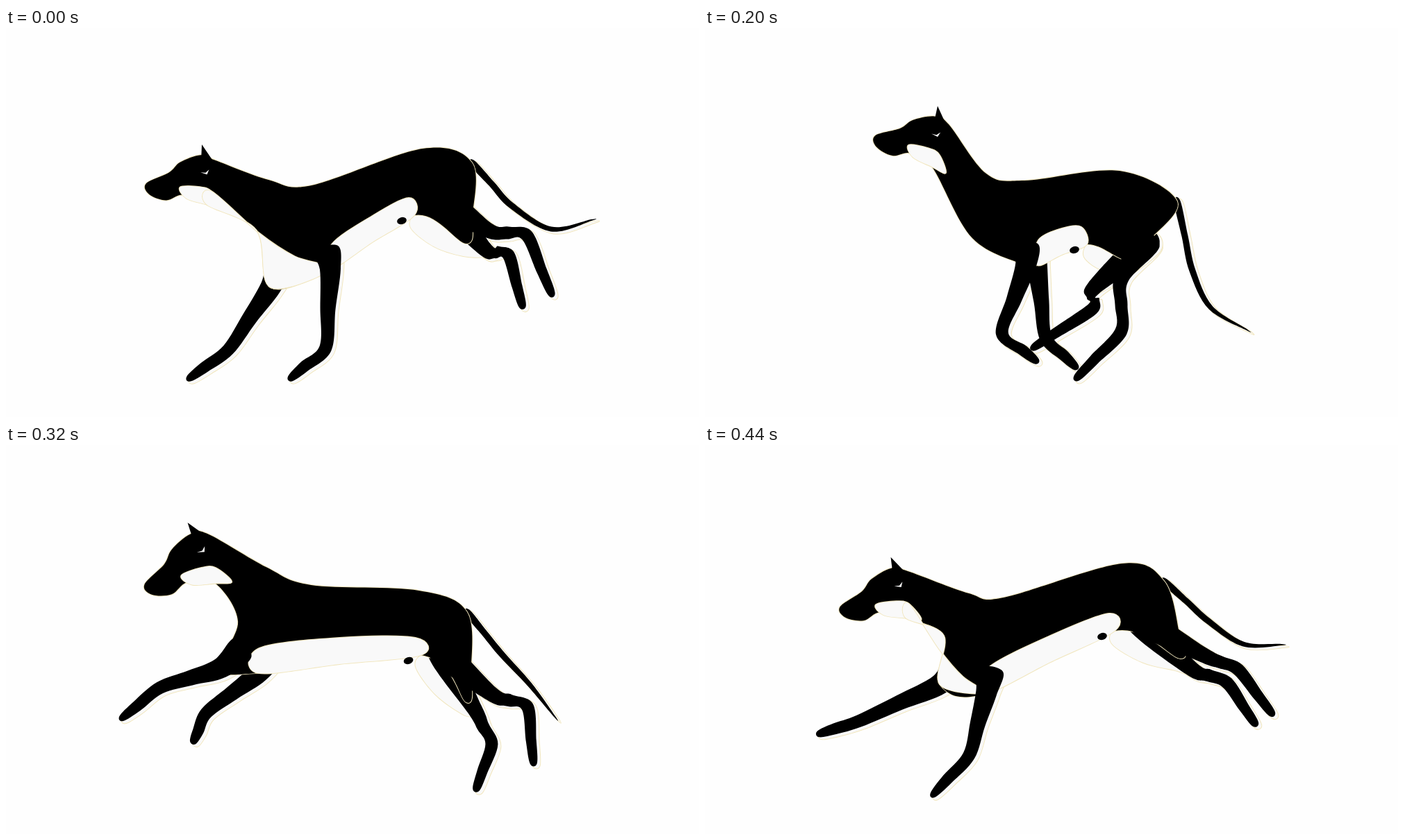
Recreate the animation shown at these times as an HTML page with a canvas. Size 998 by 561 pixels, loop 480 ms.

```html
<!DOCTYPE html>
<html lang="en">
<head>
<meta charset="utf-8">
<title>Galloping hound</title>
<style>
  html, body { margin: 0; height: 100%; overflow: hidden; background: #fefefe; }
  canvas { display: block; }
</style>
</head>
<body>
<canvas id="stage" width="998" height="561"></canvas>
<script>
const ctx = document.getElementById('stage').getContext('2d');
const STEP = 40, STEPS = 12;
const BLACK = '#000', PALE = '#f9f9f9', CREAM = '#f1e6bd';

// Key poses hold joints only; every outline is derived from them.
// torso: nose, nape, neck, withers, back, tail root, thigh, flank, breast
// fore: elbow, wrist, toe; hind: knee, hock, toe
const poses = [
  { at: 0,
    torso: [203,232, 302,191, 378,219, 440,227, 600,174, 671,194, 663,311, 588,270, 361,292],
    foreA: [467,348, 460,462, 409,506], foreB: [381,374, 320,464, 263,506],
    hindA: [695,292, 750,299, 786,384], hindB: [690,319, 724,328, 744,402],
    tail: [728,256, 785,290, 843,277] },
  { at: 2,
    torso: [211,228, 314,190, 390,224, 445,228, 595,179, 669,208, 645,322, 582,288, 368,300],
    foreA: [493,340, 514,453, 487,505], foreB: [434,358, 400,466, 340,506],
    hindA: [685,299, 731,301, 740,393], hindB: [665,331, 688,336, 686,430],
    tail: [712,275, 765,316, 827,283] },
  { at: 3,
    torso: [222,210, 328,180, 392,224, 448,229, 582,183, 670,221, 615,313, 562,285, 378,305],
    foreA: [496,340, 511,448, 563,485], foreB: [455,357, 472,467, 418,505],
    hindA: [645,300, 683,304, 652,390], hindB: [597,328, 636,370, 590,452],
    tail: [694,305, 735,347, 786,303] },
  { at: 5,
    torso: [245,163, 351,139, 405,210, 460,220, 597,206, 680,250, 610,335, 550,312, 385,303],
    foreA: [462,342, 428,441, 478,481], foreB: [478,342, 491,447, 535,490],
    hindA: [600,360, 599,438, 535,505], hindB: [560,375, 558,405, 473,461],
    tail: [702,350, 728,403, 780,435] },
  { at: 7,
    torso: [224,196, 314,121, 395,178, 460,207, 600,224, 680,266, 648,402, 597,320, 357,262],
    foreA: [355,328, 262,375, 220,411], foreB: [414,326, 377,405, 404,464],
    hindA: [690,392, 730,425, 690,506], hindB: [645,400, 662,448, 578,506],
    tail: [718,328, 742,375, 764,461] },
  { at: 9,
    torso: [187,220, 275,143, 360,183, 420,201, 590,191, 649,211, 676,330, 592,283, 318,255],
    foreA: [290,322, 222,346, 165,400], foreB: [322,335, 215,376, 152,400],
    hindA: [700,320, 757,331, 811,410], hindB: [695,355, 727,402, 766,474],
    tail: [712,278, 765,315, 820,316] },
  { at: 11,
    torso: [197,241, 292,182, 380,214, 430,220, 600,171, 661,196, 685,308, 590,268, 344,275],
    foreA: [405,358, 380,448, 328,505], foreB: [338,345, 222,398, 163,417],
    hindA: [718,303, 768,324, 817,388], hindB: [700,322, 752,343, 793,403],
    tail: [725,254, 775,287, 830,288] }
];

// Rigid head, measured along and across the line from nose to nape.
const HEAD = {
  crown: [.017,-.07, .36,-.09, .55,-.16, .84,-.145, 1,0],
  jaw: [.66,.5, .42,.26, .18,.24, 0,.08],
  ear: [.84,-.12, .91,-.27, .96,-.03],
  eye: [.75,.07, .81,.1, .87,.08, .82,.13],
  throat: [.42,.15, .67,.25, .79,.365, .82,.62, .66,.5, .44,.32]
};

const pairs = list => Array.from({ length: list.length / 2 }, (_, i) => list.slice(2 * i, 2 * i + 2));
const mix = (a, b, t) => [a[0] + (b[0] - a[0]) * t, a[1] + (b[1] - a[1]) * t];
const shift = (p, dx, dy) => [p[0] + dx, p[1] + dy];

// Pose k places around the loop, with its step unwrapped past the ends.
function key(k) {
  const n = poses.length, pose = poses[(k + n) % n];
  return { pose, at: pose.at + Math.floor(k / n) * STEPS };
}

// Cubic blend through the neighbouring key poses.
function poseAt(step) {
  const i = poses.findLastIndex(p => p.at <= step);
  const [a, b, c, d] = [i - 1, i, i + 1, i + 2].map(key);
  const h = c.at - b.at, u = (step - b.at) / h;
  const result = {};
  for (const part of Object.keys(b.pose).filter(name => name !== 'at')) {
    result[part] = pairs(b.pose[part].map((p, j) => {
      const q = c.pose[part][j];
      const m = h * (q - a.pose[part][j]) / (c.at - a.at);
      const n = h * (d.pose[part][j] - p) / (d.at - b.at);
      return p + u * (m + u * (3 * (q - p) - 2 * m - n + u * (2 * (p - q) + m + n)));
    }));
  }
  return result;
}

// Closed smooth curve through all points.
function smooth(points) {
  const path = new Path2D(), n = points.length;
  path.moveTo(...points[0]);
  for (let i = 0; i < n; i++) {
    const [a, b, c, d] = [i + n - 1, i, i + 1, i + 2].map(k => points[k % n]);
    path.bezierCurveTo(b[0] + (c[0] - a[0]) / 6, b[1] + (c[1] - a[1]) / 6,
      c[0] - (d[0] - b[0]) / 6, c[1] - (d[1] - b[1]) / 6, c[0], c[1]);
  }
  return path;
}

function polygon(points) {
  const path = new Path2D();
  points.forEach(p => path.lineTo(...p));
  path.closePath();
  return path;
}

// Tapering band along the joints.
function ribbon(joints, widths) {
  const left = [], right = [];
  joints.forEach(([x, y], i) => {
    const from = joints[Math.max(i - 1, 0)], to = joints[Math.min(i + 1, joints.length - 1)];
    const dx = to[0] - from[0], dy = to[1] - from[1];
    const r = widths[i] / 2 / Math.hypot(dx, dy);
    left.push([x - dy * r, y + dx * r]);
    right.unshift([x + dy * r, y - dx * r]);
  });
  return smooth([...left, ...right]);
}

// Leg with straight bones below its upper joint.
function leg(top, [a, b, c], widths) {
  return ribbon([top, a, mix(a, b, .5), b, mix(b, c, .6), c], widths);
}

function paint(path, color, fringe = 2) {
  ctx.strokeStyle = CREAM;
  ctx.lineWidth = fringe;
  if (fringe) ctx.stroke(path);
  ctx.fillStyle = color;
  ctx.fill(path);
}

function draw(step) {
  const { torso, foreA, foreB, hindA, hindB, tail } = poseAt(step);
  const [nose, nape, neck, withers, back, root, thigh, flank, breast] = torso;
  const [chest, brisket] = [foreA[0], foreB[0]].sort((p, q) => p[0] - q[0]);
  const hip = shift(root, -40, 55);

  const dx = nape[0] - nose[0], dy = nape[1] - nose[1];
  const head = list => pairs(list).map(([u, v]) => shift(nose, u * dx - v * dy, u * dy + v * dx));
  const throat = head(HEAD.throat);

  const fore = joints => leg(mix(joints[0], withers, .25), joints, [36, 30, 22, 18, 16, 9]);
  const hind = joints => leg(hip, joints, [36, 22, 18, 18, 15, 10]);
  const near = [fore(foreA), hind(hindA)], far = [fore(foreB), hind(hindB)];
  const tailPath = ribbon([root, mix(root, tail[0], .5), ...tail], [9, 9, 9, 7, 2]);

  ctx.fillStyle = '#fefefe';
  ctx.fillRect(0, 0, 998, 561);

  // Pale underside beside each limb and below the haunch
  ctx.save();
  ctx.translate(4, 3);
  [...near, ...far, tailPath].forEach(path => paint(path, PALE));
  ctx.restore();
  const fold = mix(flank, thigh, .5);
  paint(ribbon([flank, fold, thigh, hindB[0]].map(p => shift(p, 0, 8)), [22, 38, 22, 6]), PALE);

  [...far, tailPath].forEach(path => paint(path, BLACK, 0));
  const buttock = shift(mix(root, thigh, .65), 6, 0);
  paint(smooth([...head(HEAD.crown), neck, withers, back, root, buttock, thigh, flank,
    brisket, chest, breast, ...head(HEAD.jaw)]), BLACK);
  paint(polygon(head(HEAD.ear)), BLACK, 0);

  // White belly, throat, and a bib that shows when the head is low
  const waist = mix(brisket, flank, .5);
  paint(smooth([brisket, shift(brisket, 2, -36), shift(waist, 0, -38),
    shift(flank, -8, -25), flank, waist]), PALE);
  paint(smooth(throat), PALE);
  const bib = Math.min(1, (nape[1] - 143) / 37);
  if (bib > 0) {
    const edge = (p, t) => mix(p, shift(mix(throat[2], brisket, t), 0, 15), bib);
    paint(smooth([throat[4], breast, chest, brisket, edge(chest, .7), edge(breast, .4), throat[2]]), PALE);
  }

  near.forEach(path => paint(path, BLACK, 0));
  paint(polygon(head(HEAD.eye)), PALE, 0);
  const spot = new Path2D();
  spot.ellipse(flank[0] - 18, flank[1] + 8, 7, 5, -.3, 0, Math.PI * 2);
  paint(spot, BLACK, 0);
}

function tick() {
  draw(Math.floor(performance.now() / STEP) % STEPS);
  requestAnimationFrame(tick);
}
tick();
</script>
</body>
</html>
```
